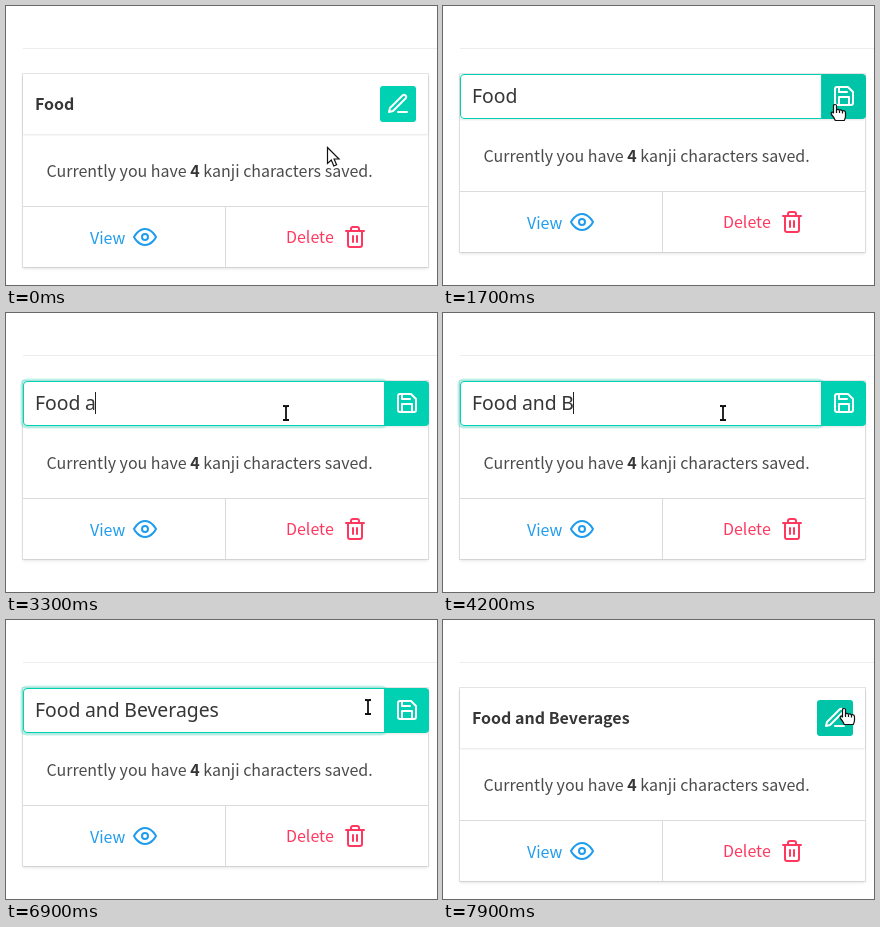
An HTML page for the animation above (8000 ms loop, 431 by 279 pixels).

```html
<!DOCTYPE html>
<html lang="en">
<head>
<meta charset="utf-8">
<title>Rename a list</title>
<style>
  html, body { margin: 0; width: 100%; height: 100%; overflow: hidden; background: #fff; }
  svg { display: block; width: 431px; height: 279px; }
  text { font: 16px "Noto Sans CJK JP", "Noto Sans CJK", "Noto Sans CJK SC", sans-serif; fill: #4a4a4a; white-space: pre; }
  .bold { font-weight: 700; fill: #363636; }
  #value { font: 19.4px "Noto Sans", sans-serif; word-spacing: -.5px; fill: #363636; }
  .icon { fill: none; stroke-width: 2; stroke-linecap: round; stroke-linejoin: round; }
  .card { width: 405px; background: #fff; position: absolute; left: 17px; top: 68px;
    box-shadow: 0 2px 3px rgba(10,10,10,.1), 0 0 0 1px rgba(10,10,10,.1); }
  .head { height: 60px; box-shadow: 0 1px 2px rgba(10,10,10,.1); }
  svg { position: absolute; left: 0; top: 0; }
</style>
</head>
<body>
<div class="card" id="card"><div class="head" id="head"></div></div>
<svg viewBox="0 0 431 279">
  <path d="M17 42.5H431" stroke="#ededed"/>

  <g id="show">
    <text id="title" class="bold" x="29" y="104"></text>
    <rect class="button" x="374" y="80" width="36" height="36" rx="3"/>
    <g class="icon" stroke="#fff" transform="translate(380 86)">
      <path d="M12 20h9M16.5 3.5a2.12 2.12 0 0 1 3 3L7 19l-4 1 1-4z"/>
    </g>
  </g>

  <g id="edit">
    <rect id="glow" x="14.5" y="65.5" width="367" height="50" rx="6" fill="#00d1b2" fill-opacity=".25"/>
    <path class="button" d="M378 68h41a4 4 0 0 1 4 4v37a4 4 0 0 1-4 4h-41z"/>
    <path id="field" d="M378.500 68.500H21a3.500 3.500 0 0 0-3.500 3.500v37a3.500 3.500 0 0 0 3.500 3.500h357.500z" fill="#fff" stroke="#00d1b2"/>
    <text id="value" x="29" y="97"></text>
    <rect id="caret" y="79" width="1" height="22" fill="#222"/>
    <g class="icon" stroke="#fff" transform="translate(389 78)">
      <path d="M19 21H5a2 2 0 0 1-2-2V5a2 2 0 0 1 2-2h11l5 5v11a2 2 0 0 1-2 2zM17 21v-8H7v8M7 3v5h8"/>
    </g>
  </g>

  <g id="body">
    <text x="40.500" y="171">Currently you have <tspan class="bold">4</tspan> kanji characters saved.</text>
    <path d="M17 200.500H422M219.500 200V261" stroke="#dbdbdb"/>
    <text x="84" y="238" style="fill:#209cee">View</text>
    <g class="icon" stroke="#209cee" transform="translate(127 219)">
      <path d="M1 12s4-8 11-8 11 8 11 8-4 8-11 8S1 12 1 12z"/><circle cx="12" cy="12" r="3"/>
    </g>
    <text x="280" y="237" style="fill:#ff3860">Delete</text>
    <g class="icon" stroke="#ff3860" transform="translate(337 219)">
      <path d="M3 6h18M19 6v14a2 2 0 0 1-2 2H7a2 2 0 0 1-2-2V6M8 6V4a2 2 0 0 1 2-2h4a2 2 0 0 1 2 2v2M10 11v6M14 11v6"/>
    </g>
  </g>

  <g id="arrow" fill="#fff" stroke="#111" stroke-width="1.200">
    <path d="M.5 .5V16.500L4.300 13 6.800 19 9.600 17.800 7.100 12H12z"/>
  </g>
  <g id="hand" fill="#fff" stroke="#111" stroke-width="1.200" stroke-linejoin="round">
    <path d="M-1.500 9V1.500Q-1.500 .5 0 .5T1.500 1.500V6Q3 4.800 4.500 6.200 6 5.400 7.300 6.800 10.500 6 10.500 9V12Q10.500 14 9.300 16.500H.3Q-.5 14-3.500 10.500-4.300 8.500-3 8-2 8-1.500 9.500"/>
    <path d="M1.500 6V9M4.500 6.500V9M7.500 7V9.500" fill="none"/>
  </g>
  <g id="beam" fill="none">
    <path id="bar" d="M-3-7H-1L0-6 1-7H3M0-6V6M-3 7H-1L0 6 1 7H3" stroke="#fff" stroke-width="4"/>
    <use href="#bar" style="stroke:#111;stroke-width:1.600"/>
    <path d="M-3-7H-1L0-6 1-7H3M0-6V6M-3 7H-1L0 6 1 7H3" stroke="#111" stroke-width="1.800"/>
  </g>
</svg>
<script>
const LOOP = 8000;
const NAME = "Food and Beverages";
const $ = id => document.getElementById(id);

// time, pointer shape, x, y
const pointer = [
  [0, "arrow", 321, 141], [200, "arrow", 335, 134], [300, "arrow", 360, 118],
  [400, "hand", 384, 103], [500, "hand", 392, 98],
  [1900, "beam", 367, 98], [2000, "beam", 305, 100], [2100, "beam", 280, 100],
  [6700, "beam", 292, 99], [6800, "beam", 328, 92], [6900, "beam", 362, 87],
  [7000, "hand", 386, 86], [7100, "hand", 398, 87], [7200, "hand", 401, 88]
];
// time, letters typed
const typed = [
  [0, 4], [3200, 5], [3300, 6], [3400, 7], [3600, 9], [4200, 10], [4500, 11], [4900, 12],
  [5100, 13], [5200, 14], [5300, 15], [5600, 16], [5700, 17], [5900, 18]
];
// time, caret visible
const blink = [[0, 0], [2300, 1], [2900, 0], [3200, 1], [6500, 0], [7000, 1], [7600, 0]];

const at = (steps, t) => steps.findLast(s => s[0] <= t);
const show = (id, on) => $(id).setAttribute("visibility", on ? "visible" : "hidden");

function draw(t) {
  const editing = t >= 1600 && t < 7900;
  const focused = t >= 2300 && t < 7700;
  const [, shape, x, y] = at(pointer, t);
  const text = NAME.slice(0, at(typed, t)[1]);

  show("show", !editing);
  show("edit", editing);
  show("glow", editing && focused);
  $("title").textContent = text;
  $("value").textContent = text;
  $("caret").setAttribute("x", Math.round(28.5 + $("value").getComputedTextLength()));
  show("caret", focused && at(blink, t)[1]);

  $("card").style.height = editing ? "178px" : "193px";
  $("head").style.height = editing ? "45px" : "60px";
  $("body").setAttribute("transform", `translate(0 ${editing ? -15 : 0})`);

  const fill = shape === "hand" ? "#00c4a7" : "#00d1b2";
  document.querySelectorAll(".button").forEach(b => b.setAttribute("fill", fill));
  for (const id of ["arrow", "hand", "beam"]) show(id, id === shape);
  $(shape).setAttribute("transform", `translate(${x} ${y})`);
}

function tick() {
  draw(performance.now() % LOOP);
  requestAnimationFrame(tick);
}
tick();
</script>
</body>
</html>
```
